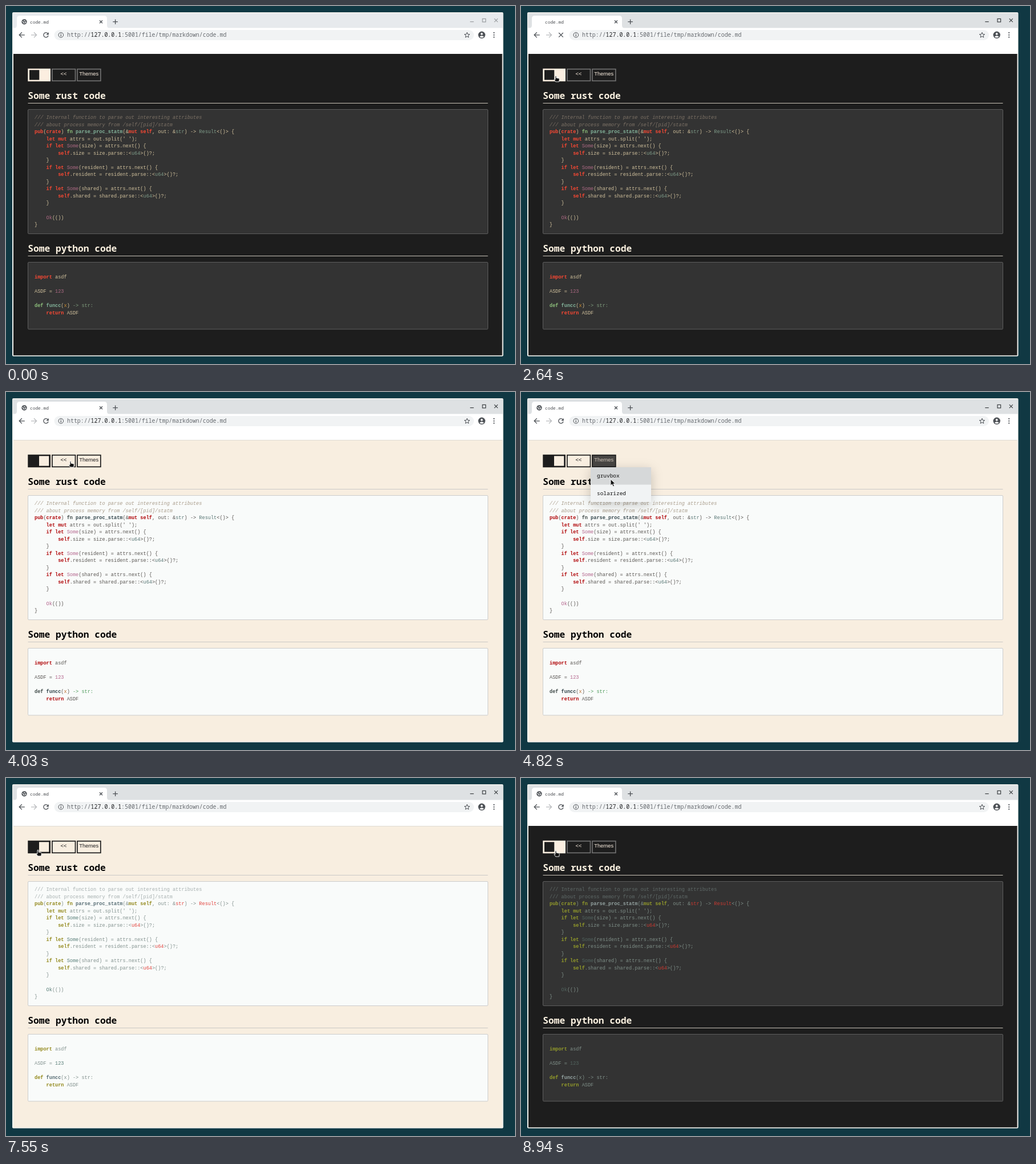
Animation, 892 px wide and 628 px high, one loop 9750 ms. Source, as an HTML page:

```html
<!DOCTYPE html>
<html lang="en">
<head>
<meta charset="utf-8">
<title>code.md</title>
<style>
html, body { margin: 0; width: 100%; height: 100%; overflow: hidden; background: #103843; }
svg { display: block; width: 892px; height: 628px; }
text { white-space: pre; }
.mono { font-family: "Noto Sans Mono", "DejaVu Sans Mono", monospace; }
.sans { font-family: "Liberation Sans", Arial, sans-serif; font-size: 9.4px; text-anchor: middle; }
.code text { font: 8.58px "Liberation Mono", "Courier New", monospace; fill: var(--text); }
.line { fill: none; stroke: #4d5156; stroke-width: 1.3; }

.dark {
  --page: #1d1d1d; --ink: #fbeee0; --head: #fbf1e0; --edge: #707070; --rule: #c9c3b8;
  --box: #333333; --boxEdge: #5e5e5e; --top: #1d1d1d;
}
.light {
  --page: #f8eee0; --ink: #1d1d1d; --head: #050505; --edge: #1d1d1d; --rule: #cbc8c6;
  --box: #f9fbfa; --boxEdge: #cccccc; --top: #dedbd4;
}
.gruvbox.dark {
  --text: #d0c09c; --c: #7d7266; --k: #fb4934; --d: #8ec07c; --f: #83b39a;
  --p: #ad6a84; --t: #7f9c89; --a: #cc8a2c; --y: #7f9c7d;
}
.gruvbox.light {
  --text: #5a5653; --c: #a99c8b; --k: #b00508; --d: #3f4a48; --f: #34464c;
  --p: #b3648c; --t: #587674; --a: #bd7030; --y: #4f9c5c;
}
.solarized.light {
  --text: #83928f; --c: #a7b0b0; --k: #93891c; --d: #93891c; --f: #586e75;
  --p: #587e78; --t: #e2453f; --a: #83928f; --y: #83928f;
}
.solarized.dark {
  --text: #7f8f88; --c: #5f6a68; --k: #939b2b; --d: #939b2b; --f: #94a3a1;
  --p: #52645f; --t: #c93a31; --a: #7f8f88; --y: #7f8f88;
}
.c { fill: var(--c); }
.gruvbox .c { font-style: italic; }
.k { fill: var(--k); font-weight: bold; }
.d { fill: var(--d); font-weight: bold; }
.f { fill: var(--f); font-weight: bold; }
.p { fill: var(--p); }
.t { fill: var(--t); }
.a { fill: var(--a); }
.y { fill: var(--y); }
.head { font-size: 16.25px; font-weight: 600; fill: var(--head); }
.rule { stroke: var(--rule); }
.box { fill: var(--box); stroke: var(--boxEdge); }
.btn { fill: none; stroke: var(--edge); stroke-width: 1.7; }
.menu { filter: drop-shadow(0 5px 10px rgba(0, 0, 0, .2)); }
</style>
</head>
<body>
<svg id="stage" viewBox="0 0 892 628" class="gruvbox dark">
  <rect width="892" height="628" fill="#103843"/>
  <rect x="11" y="11" width="860.5" height="603.5" rx="2" fill="#f3f2ee"/>
  <rect id="strip" x="12" y="12.5" width="858.5" height="27"/>
  <path d="M14 39 Q19 39 19 34 V22 Q19 17 24 17 H172 Q177 17 177 22 V34 Q177 39 182 39 Z" fill="#fff"/>
  <rect x="12" y="38.5" width="858.5" height="46" fill="#fff"/>

  <g id="favicon">
    <circle cx="32" cy="27.8" r="4.7" fill="#4d5156"/>
    <path d="M28.6 26.6 l2.2 2 v2.2 M31.5 24.4 l.6 1.7 l2.4 .4 M32.6 30.6 l1 -2 l1.9 .4" fill="none" stroke="#fff" stroke-width="1.1"/>
  </g>
  <text class="mono" x="42" y="30.7" font-size="7.85" fill="#4a4d51">code.md</text>
  <path class="line" d="M164 25.3 l5 5 m0 -5 l-5 5"/>
  <path class="line" d="M187.3 27.7 h8.6 m-4.3 -4.3 v8.6"/>
  <g id="controls" fill="none" stroke-width="1.2">
    <path d="M813.3 27.6 h6.4"/>
    <rect x="835" y="22.4" width="5.6" height="5.6"/>
    <path d="M855.8 22.2 l6 6 m0 -6 l-6 6"/>
  </g>

  <path class="line" d="M32.8 50.8 h-9.6 m4.6 -4.6 l-4.6 4.6 l4.6 4.6"/>
  <path class="line" d="M44 50.8 h9.6 m-4.6 -4.6 l4.6 4.6 l-4.6 4.6" style="stroke:#b9bbbe"/>
  <g id="reload">
    <path class="line" d="M73.2 47.9 A4.2 4.2 0 1 0 74.1 52"/>
    <path d="M74.8 46 v4.4 h-4.4 z" fill="#4d5156"/>
  </g>
  <path id="stop" class="line" d="M66.2 47 l7.6 7.6 m0 -7.6 l-7.6 7.6"/>
  <rect x="84.500" y="42" width="735.5" height="18" rx="9" fill="#f1f3f4"/>
  <circle class="line" cx="96.3" cy="50.8" r="4.3" style="stroke-width:1"/>
  <path class="line" d="M96.3 50.2 v3 M96.3 48 v1.2"/>
  <text class="mono" x="107" y="54.3" font-size="9.91" fill="#676b70">http://<tspan fill="#202124">127.0.0.1</tspan>:5001/file/tmp/markdown/code.md</text>
  <path id="star" class="line" style="stroke-width:1"/>
  <circle cx="833.7" cy="50.8" r="6.2" fill="#4d5156"/>
  <circle cx="833.7" cy="48.9" r="1.9" fill="#fff"/>
  <path d="M829.8 53.9 q3.9 -3.4 7.800 0 q-3.900 3.400 -7.800 0" fill="#fff"/>
  <g fill="#4d5156"><circle cx="855.2" cy="46.900" r="1.1"/><circle cx="855.2" cy="50.800" r="1.1"/><circle cx="855.2" cy="54.700" r="1.1"/></g>

  <rect x="13" y="84.5" width="856.5" height="528.3" style="fill:var(--page)"/>
  <path d="M13 84.500 h856.5" style="stroke:var(--top)"/>
  <rect x="38.3" y="109.800" width="39.700" height="22.400" style="fill:var(--ink)"/>
  <rect id="knob" y="112.300" width="17.300" height="17.300" style="fill:var(--page)"/>
  <rect class="btn" x="80.900" y="110.700" width="40.600" height="20.600"/>
  <rect id="hover" x="124.500" y="110.500" width="41.500" height="21" fill="#1d1d1d"/>
  <rect class="btn" x="125" y="110.700" width="40.800" height="20.600"/>
  <text class="sans" x="100.900" y="121.700" style="fill:var(--ink)">&lt;&lt;</text>
  <text id="themes" class="sans" x="145.200" y="121.700">Themes</text>

  <text class="mono head" x="38.300" y="162.700">Some rust code</text>
  <path class="rule" d="M38.500 170.500 h806"/>
  <rect class="box" x="38.500" y="181.500" width="806" height="218" rx="1.5"/>
  <text class="mono head" x="38.300" y="430.500">Some python code</text>
  <path class="rule" d="M38.500 438.500 h806"/>
  <rect class="box" x="38.500" y="449.500" width="806" height="117.500" rx="1.5"/>
  <g id="code" class="code"></g>

  <g id="menu">
    <rect class="menu" x="122" y="132" width="106" height="61" fill="#f1f3f4"/>
    <rect id="choice" x="122" width="106" height="30.500" fill="#d6d8d9"/>
    <g class="mono" font-size="9.45" fill="#111">
      <text x="133" y="150.200">gruvbox</text>
      <text x="133" y="180.600">solarized</text>
    </g>
  </g>

  <g id="cursor" fill="#111" stroke="#fff" stroke-width=".9" stroke-linejoin="round">
    <path id="arrow" d="M0 0 V11.200 L2.600 8.800 L4.500 12.800 L6.500 11.900 L4.700 8 H8.300 Z"/>
    <path id="hand" d="M-1 .7 Q0 -.3 1 .7 V4 L5.300 4.900 Q6.400 5.300 6.300 6.500 L5.700 10.900 H-.3 L-3 7.100 Q-2.700 5.600 -1 7 Z"/>
  </g>
</svg>
<script>
const LOOP = 9750, STEP = 40;
const $ = id => document.getElementById(id);
const show = (id, on) => $(id).setAttribute("display", on ? "inline" : "none");
const within = (t, from, to) => t >= from && t < to;
const clamp = v => Math.max(0, Math.min(1, v));
const smooth = u => u * u * (3 - 2 * u);
const easeOut = u => 1 - (1 - u) ** 2.3;

// "@kword@" marks a word with token class k
const rust = [
  "@c/// Internal function to parse out interesting attributes@",
  "@c/// about process memory from /self/[pid]/statm@",
  "@kpub@(@kcrate@) @dfn@ @fparse_proc_statm@(&@kmut self@, out: &@tstr@) -> @tResult@<()> {",
  "    @klet mut@ attrs = out.split(' ');",
  ...["size", "resident", "shared"].flatMap(name => [
    `    @kif let@ @pSome@(${name}) = attrs.next() {`,
    `        @kself@.${name} = ${name}.parse::<@tu64@>()?;`,
    "    }"
  ]),
  "", "    @pOk@(())", "}"
];
const python = [
  "@kimport@ asdf", "", "ASDF = @p123@", "",
  "@ddef@ @ffuncc@(@ax@) @y-> str:@", "    @kreturn@ ASDF"
];

function svg(tag, parent, attrs, text = "") {
  const el = document.createElementNS("http://www.w3.org/2000/svg", tag);
  for (const key in attrs) el.setAttribute(key, attrs[key]);
  el.textContent = text;
  return parent.appendChild(el);
}

function addCode(lines, top) {
  lines.forEach((line, row) => {
    const text = svg("text", $("code"), { x: 50, y: top + row * 12.54 });
    line.split("@").forEach((part, i) => {
      if (i % 2) svg("tspan", text, { class: part[0] }, part.slice(1));
      else text.append(part);
    });
  });
}
addCode(rust, 198);
addCode(python, 478.2);

const starPoints = Array.from({ length: 10 }, (_, i) => {
  const r = i % 2 ? 2.1 : 4.9, a = i * Math.PI / 5;
  return `${808 + r * Math.sin(a)} ${51.2 - r * Math.cos(a)}`;
});
$("star").setAttribute("d", `M${starPoints.join("L")}Z`);

// start, end, target x, target y, easing
const moves = [
  [990, 1790, 62, 134, smooth],
  [1970, 2130, 61, 122, smooth],
  [3750, 4280, 147, 120, smooth],
  [4740, 4980, 161, 166, easeOut],
  [5190, 5190, 162, 171, smooth],
  [6530, 7180, 55, 126, smooth],
  [7510, 7550, 56, 126, smooth],
  [8390, 8390, 56.500, 126, smooth],
  [8740, 8940, 61, 127, smooth]
];

function cursorAt(t) {
  let x = 0, y = 362;
  for (const [start, end, toX, toY, ease] of moves) {
    if (t < start) break;
    const steps = Math.round((end - start) / STEP) + 1;
    const u = ease(clamp((Math.floor((t - start) / STEP) + 1) / steps));
    x += (toX - x) * u;
    y += (toY - y) * u;
  }
  return [Math.round(x), Math.round(y)];
}

const fade = (t, start) => clamp(Math.floor((t - start) / STEP) * STEP / 200);
const mix = (a, b, u) => `rgb(${a.map((v, i) => Math.round(v + (b[i] - v) * u))})`;
const cream = [251, 238, 224], black = [29, 29, 29];

function draw(t) {
  const light = within(t, 2680, 7590);
  const theme = t < 5390 ? "gruvbox" : "solarized";
  $("stage").setAttribute("class", `${theme} ${light ? "light" : "dark"}`);
  $("knob").setAttribute("x", light ? 58 : 41);

  const focused = t >= 1190;
  $("strip").setAttribute("fill", focused ? "#dee1e3" : "#e7eaed");
  $("controls").setAttribute("stroke", focused ? "#3c4043" : "#9a9da0");

  const reopening = within(t, 5350, 5390);
  const loading = within(t, 2600, 2680) || reopening;
  show("favicon", !within(t, 2640, 2680) && !reopening);
  show("reload", !loading);
  show("stop", loading);

  const [x, y] = cursorAt(t);
  const hand = y >= 110 && y < 132 && x >= 38 && x < 166;
  show("cursor", t >= 990);
  show("arrow", !hand);
  show("hand", hand);
  $("cursor").setAttribute("transform", `translate(${x} ${y})`);

  const glow = t < 5390 ? fade(t, 4070) - fade(t, 4770 - 10) : 0;
  $("hover").setAttribute("opacity", glow);
  $("themes").setAttribute("fill", light ? mix(black, cream, glow) : mix(cream, cream, 0));

  show("menu", within(t, 4070, 5390));
  show("choice", y >= 132);
  $("choice").setAttribute("y", y < 163 ? 132 : 162.5);
}

const began = performance.now();
function tick() {
  draw((performance.now() - began) % LOOP);
  requestAnimationFrame(tick);
}
tick();
</script>
</body>
</html>
```
